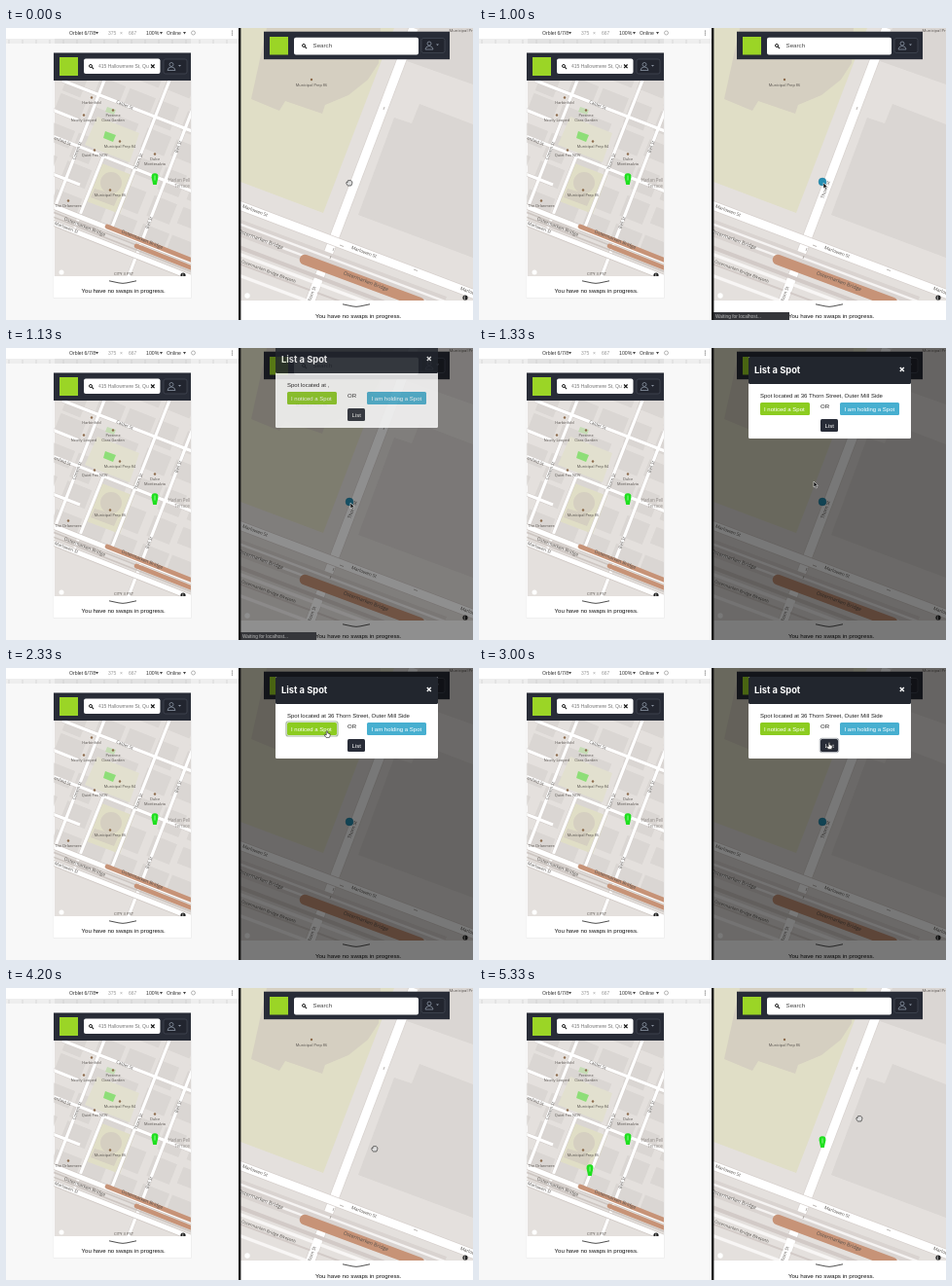
An HTML page for the animation above (5.39 s loop, 480 by 300 pixels).

```html
<!DOCTYPE html>
<html lang="en">
<head>
<meta charset="utf-8">
<title>List a spot</title>
<style>
html, body { margin: 0; width: 100%; height: 100%; overflow: hidden; background: #f8f8f8; }
svg { display: block; width: 100vw; height: 100vh; }
text { font: 6px "Liberation Sans", Arial, sans-serif; white-space: pre; }
.map text { font-family: "Open Sans", "Noto Sans", sans-serif; fill: #55504c; text-anchor: middle; }
</style>
</head>
<body>
<svg id="stage" viewBox="0 0 480 300"></svg>
<script>
const LOOP = 5390;
const DARK = '#282c37', LAND = '#e4e0dd', BLOCK = '#dad6d3', YARD = '#e0dec6', SCHOOL = '#d5cfc1', BROWN = '#c79377';

const rect = (x, y, w, h, fill, more = '') => `<rect x="${x}" y="${y}" width="${w}" height="${h}" fill="${fill}" ${more}/>`;
const circle = (x, y, r, fill, more = '') => `<circle cx="${x}" cy="${y}" r="${r}" fill="${fill}" ${more}/>`;
const poly = (points, fill) => `<polygon points="${points}" fill="${fill}"/>`;
const path = (d, stroke, w = 1, more = '') => `<path d="${d}" fill="none" stroke="${stroke}" stroke-width="${w}" ${more}/>`;
const text = (x, y, s, size = 6, fill = '#222', more = '') => `<text x="${x}" y="${y}" style="font-size:${size}px;fill:${fill};${more}">${s}</text>`;
const label = (x, y, s, size = 4, angle = 0, fill = '#55504c') =>
  `<text transform="translate(${x} ${y}) rotate(${angle})" y="${size * .35}" style="font-size:${size}px;fill:${fill}">${s}</text>`;
const place = (x, y, s, second) => circle(x, y - 5.5, 1.2, '#8d6b4c') + label(x, y, s, 3.9) + (second ? label(x, y + 5, second, 3.9) : '');
const group = (id, body, more = '') => `<g id="${id}" ${more}>${body}</g>`;
const pin = (x, y) => `<g transform="translate(${x} ${y})"><path d="M-1.8 6 L-3.4 -1.5 Q-3.8 -5.7 0 -5.7 T3.4 -1.5 L1.8 6Z" fill="#1fe01f"/>` +
  path('M0 -3.5V1.5', '#7bf27b', 1.2) + '</g>';
const lens = (x, y) => circle(x, y, 1.5, 'none', 'stroke="#222"') + path(`M${x + 1.1} ${y + 1.1}l2 2`, '#222', 1.1);
const chevron = (x, y) => path(`M${x - 14} ${y}l10 2.1q4 .9 8 0l10 -2.1`, '#222', .8);
const info = (x, y) => circle(x, y, 2.6, '#222') + text(x - .7, y + 1.6, 'i', 4.5, '#fff', 'font-weight:bold');
const userButton = (x, y, w) => rect(x, y, w, 15, '#22252f', 'rx="2" stroke="#454b58" stroke-width=".7"') +
  circle(x + 8, y + 5.5, 2, 'none', 'stroke="#8a93a2" stroke-width=".8"') +
  path(`M${x + 4} ${y + 11.5}q0 -3 4 -3.5q4 .5 4 3.5z`, '#8a93a2', .8) +
  poly(`${x + 15},${y + 6} ${x + 18},${y + 6} ${x + 16.5},${y + 7.8}`, '#8a93a2');

function smallBlocks() {
  let out = '';
  for (let row = -1; row < 5; row++)
    for (let col = -1; col < 6; col++) {
      const n = Math.abs(Math.sin(row * 7.3 + col * 4.1));
      out += rect(col * 32, row * 31, 20 + n * 9, 18 + (1 - n) * 10, BLOCK);
    }
  return `<g transform="matrix(.93 .37 -.37 .93 68 38)">${out}</g>`;
}

function leftMap() {
  const roads = 'M101 54L48 190M100 132L70 207M168 54L108 207M200 62L124 260M58 54L194 107M48 111L192 168M48 84L75 95M48 150L76 161';
  return rect(50, 54, 140, 201, LAND) + smallBlocks() +
    poly('94,91 137,108 127,138 81,120', '#e2e0cf') + poly('96,138 132,152 117,191 80,177', YARD) +
    circle(108, 159, 11, SCHOOL) + poly('91,165 116,172 111,183 87,174', SCHOOL) +
    poly('102,106 113,110 110,117 100,113', '#8ede78') + poly('104,81 113,84 111,89 102,86', '#c4dcb4') +
    path(roads, '#d3cdca', 4.2) + path(roads, '#fff', 3.2) +
    path('M48 183L192 240M48 200L192 257', '#d0c9c5', 6.6) + path('M48 183L192 240M48 200L192 257', '#fff', 5) +
    path('M48 189L192 246M48 194L192 251', '#cdc6c2', 1.6) +
    path('M104 204L192 239M134 224L192 247', BROWN, 4.6, 'stroke-linecap="round"') +
    label(140, 217, 'Ostermarken Bridge', 4.8, 21.5) + label(81, 204, 'Ostermarken Bridge', 4.8, 21.5) +
    label(62, 205, 'Marlowen St', 4.4, 21.5) + label(122, 79, 'Calder St', 4.4, 21.5) + label(58, 116, 'enfold St', 4.4, 21.5) +
    label(73, 126, 'Corwin St', 4.4, -69) + label(136, 137, 'Thorn St', 4.4, -69) +
    label(177, 122, 'Bell St', 4.4, -69) + label(147, 200, 'Bell St', 4.4, -69) +
    place(88, 77, 'Harbinfold') + place(80, 95, 'Neatly Looped') + place(110, 90, 'Perenne', 'Clara Garden') +
    place(117, 122, 'Municipal Prep 84') + place(91, 131, 'Quiet Fox NOV') + place(107, 172, 'Municipal Prep 86') +
    place(153, 135, 'Dulce', 'Montesalvia') + place(64, 183, 'The Orlanmere') + label(121, 253, 'CITY 3 PST', 4.2) +
    label(178, 156, 'Harlan Pell', 4.5, 0, '#8d8985') + label(181, 162, 'Terrace', 4.5, 0, '#8d8985') +
    circle(57, 251, 2.5, '#fff') + pin(153, 155) + group('newPin', pin(114, 187));
}

function rightMap() {
  return rect(241, 0, 239, 280, LAND) +
    poly('241,0 399,0 385,36 326,190 241,158', YARD) +
    poly('268,0 385,0 383,36 372,53 352,69 328,79 325,88 287,75 281,85 252,73', SCHOOL) +
    poly('425,0 480,0 480,58 412,34', BLOCK) +
    poly('399,92 417,98 425,78 480,99 480,236 362,192 379,146', BLOCK) +
    path('M419 0L311 285', '#d7d1ce', 10.6) + path('M419 0L311 285', '#fff', 9.2) +
    path('M239 205L450 284', '#d9d3d0', 17) + path('M239 201L462 285', '#f6f4f3', 2.4) + path('M239 209L445 286', '#f6f4f3', 2.4) +
    path('M239 225L400 286', '#d2cac7', 4) +
    path('M239 232L390 289M239 254L330 288', '#f8f6f5', 3.4) + path('M239 242L360 287', '#d2cac7', 2) +
    path('M239 181.8L482 273.9', '#d5cecb', 10) + path('M239 181.8L482 273.9', '#fff', 8.6) +
    path('M307 238L425 282', BROWN, 10.5, 'stroke-linecap="round"') +
    path('M321 258L311 285', '#fff', 8) +
    path('M337 226l-1 3M334 234l-1 3M389 81l-1 3M343 223l4 1.5M419 248l4 1.5', '#8d8782', .6) +
    label(256, 187.5, 'Marlowen St', 4.7, 20.5) + label(368, 230, 'Marlowen St', 4.7, 20.5) + label(480, 272, 'Marlowen St', 4.7, 20.5) +
    label(370, 260, 'Ostermarken Bridge', 5.2, 20.5) + label(262, 217, 'Ostermarken Bridge', 5.2, 20.5) +
    label(270, 250, 'Ostermarken Bridge Bikepath', 4.3, 20.5) +
    label(314, 274, 'Thorn St', 4.5, -69) + group('street', label(356, 166, 'Thorn St', 4.8, -69)) +
    place(314, 58.5, 'Municipal Prep 86') + label(473, 2.5, 'Municipal Prep 84', 4.2) +
    circle(248, 275, 2.7, '#fff') + info(472, 277) +
    group('dot', circle(353, 158, 3.9, '#258eb2', 'stroke="#1d7a9c" stroke-width=".5"')) +
    group('spotPin', pin(353, 158));
}

function leftPanel() {
  let ticks = '';
  for (let x = 3; x < 238; x += 14) ticks += `M${x} 12v4`;
  const arrow = x => poly(`${x},4 ${x + 3},4 ${x + 1.5},6.5`, '#444');
  return rect(0, 0, 240, 300, '#f8f8f8') + rect(0, 0, 240, 11, '#fff') + rect(0, 11, 240, 5, '#eee') +
    rect(50, 11, 140, 5, '#e2e2e2') + path(ticks, '#ccc', .6) +
    text(65, 7, 'Orblet 6/7/8', 5.2, '#333') + arrow(92) + text(105, 7, '375', 5, '#999') + text(117, 7, '×', 5, '#999') +
    text(126, 7, '667', 5, '#999') + text(144, 7, '100%', 5.2, '#333') + arrow(158) + text(165, 7, 'Online', 5.2, '#333') + arrow(182) +
    circle(192.5, 5, 2, 'none', 'stroke="#999" stroke-width=".7"') + [3, 5, 7].map(y => circle(232.5, y, .6, '#555')).join('') +
    rect(48.7, 25.5, 142, 252.2, '#ececec') + rect(49.3, 25.5, 140.7, 251.5, '#fff') + rect(49, 25.5, 141, 28.5, DARK) +
    rect(55, 30, 19, 19, '#9bd526') + rect(80, 31.5, 78.5, 15.5, '#fff', 'rx="2"') + lens(87, 39) +
    text(95, 41, '415 Hallowmere St, Qu', 5, '#777') + path('M149 37.5l3.6 3.6m0 -3.6l-3.6 3.6', '#111', 1.1) + userButton(162, 32, 24) +
    `<g class="map" clip-path="url(#phone)">${leftMap()}</g>` + info(182, 254) + rect(49.3, 255, 140.7, 22, '#fff') +
    chevron(120, 259.8) + text(77.5, 272, 'You have no swaps in progress.', 6.1, '#111');
}

function rightPanel() {
  return rect(241, 0, 239, 300, '#fff') + `<g class="map" clip-path="url(#wide)">${rightMap()}</g>` +
    rect(265, 3.7, 191, 28.5, DARK) + rect(271, 9, 19, 18.5, '#9bd526') + rect(296, 9.7, 128, 17.8, '#fff', 'rx="2"') +
    lens(306, 18) + text(315.5, 20.3, 'Search', 6.2, '#444') + userButton(427, 10.5, 24) +
    chevron(360, 283.8) + text(318, 297.7, 'You have no swaps in progress.', 6.25, '#111');
}

function dialog() {
  const button = (x, y, w, fill, s, tx) => rect(x, y, w, 13, fill, 'rx="1.5"') + text(tx, y + 8.6, s, 6, '#fff');
  return rect(277, 9, 167, 84, '#fff', 'rx="1.5"') + rect(277, 9, 167, 28, '#22262e', 'rx="1.5"') +
    text(283, 26, 'List a Spot', 9.3, '#fff', 'font-family:Inter,sans-serif;font-weight:700') +
    path('M432.8 20l4 4m0 -4l-4 4', '#fff', 1.4) +
    '<text id="address" x="289" y="51" fill="#222"></text>' +
    button(289, 56, 51, '#8ccc20', 'I noticed a Spot', 293) +
    group('focus', rect(288, 55, 53, 15, 'none', 'rx="2" stroke="#a4b79b" stroke-width="1.2"')) +
    text(351, 62, 'OR', 6) + button(371, 56, 61, '#47afd0', 'I am holding a Spot', 375.5) +
    button(351, 73, 18, DARK, 'List', 355.5) +
    group('listFocus', rect(350.3, 72.3, 19.4, 14.4, 'none', 'rx="2" stroke="#8b9097" stroke-width=".8"'));
}

const line = 'stroke="#333" stroke-width=".7" stroke-linejoin="round"';
const cursors =
  group('grab', `<path d="M-2.2 2.5Q-4 0 -2.8 -.8L-2 -.2V-1.8Q-1 -3 0 -2.2Q1.2 -3 2 -1.8Q3.2 -1.5 2.8 .5L1.8 3H-1.5Z" fill="#ddd" ${line}/>`) +
  group('arrow', '<path d="M0 -1V5L1.4 3.8L2.4 6L3.5 5.5L2.5 3.4H4.3Z" fill="#111" stroke="#fff" stroke-width=".5"/>') +
  group('hand', `<path d="M-.8 0V-3Q0 -4 .7 -3V-1L3 -.3Q3.7 1 2.4 3.4H-1L-3 .7Q-2.5 -.3 -.8 1Z" fill="#fff" ${line}/>`);

document.getElementById('stage').innerHTML =
  `<clipPath id="phone">${rect(49.3, 54, 140.7, 201, '#000')}</clipPath><clipPath id="wide">${rect(241, 0, 239, 280, '#000')}</clipPath>` +
  leftPanel() + rightPanel() + group('shade', rect(241, 0, 239, 300, '#000')) + group('modal', dialog()) +
  group('status', rect(241, 292, 78, 8, '#35363a') + text(243, 298, 'Waiting for localhost...', 4.8, '#bbb')) +
  group('cursor', cursors) + rect(239, 0, 2.4, 300, '#111');

const el = id => document.getElementById(id);
const clamp = v => Math.max(0, Math.min(1, v));
const alpha = (id, v) => el(id).setAttribute('opacity', v);
const between = (t, a, b) => t >= a && t < b ? 1 : 0;

// time, x, y
const track = [[0, 353, 159], [1150, 354, 160], [1330, 344, 138], [1430, 344, 138], [2000, 330, 68], [2330, 330, 68],
  [2800, 360, 80], [3270, 360, 80], [3670, 379, 165], [4770, 379, 165], [5330, 391, 134], [LOOP, 391, 134]];
const kinds = [[0, 'grab'], [870, 'arrow'], [1900, 'hand'], [2440, 'arrow'], [2750, 'hand'], [3270, 'grab']];

function cursorAt(t) {
  const i = track.findIndex(k => k[0] > t), [t0, x0, y0] = track[i - 1], [t1, x1, y1] = track[i];
  const p = (t - t0) / (t1 - t0), e = p * p * (3 - 2 * p);
  return [x0 + (x1 - x0) * e, y0 + (y1 - y0) * e];
}

function draw(t) {
  const open = between(t, 1040, 3270), fade = open * clamp((t - 1040) / 110);
  const slide = (1 - clamp((t - 1040) / 300)) ** 1.8 * -21;
  alpha('shade', fade * .53);
  alpha('modal', fade);
  el('modal').setAttribute('transform', `translate(0 ${slide})`);
  el('address').textContent = 'Spot located at ' + (t < 1260 ? ',' : '36 Thorn Street, Outer Mill Side');
  alpha('focus', between(t, 2070, 2870));
  alpha('listFocus', between(t, 2870, 3270));
  alpha('street', t < 4130 ? clamp((t - 10) / 120) : 0);
  alpha('dot', between(t, 870, 4130));
  alpha('newPin', clamp((t - 4340) / 190));
  alpha('spotPin', clamp((t - 4340) / 190));
  alpha('status', between(t, 930, 1260) || between(t, 3270, 3660));
  const kind = kinds.filter(k => k[0] <= t).pop()[1];
  for (const id of ['grab', 'arrow', 'hand']) alpha(id, +(id === kind));
  el('cursor').setAttribute('transform', `translate(${cursorAt(t)})`);
}

const start = performance.now();
function tick() {
  draw((performance.now() - start) % LOOP);
  requestAnimationFrame(tick);
}
tick();
</script>
</body>
</html>
```
